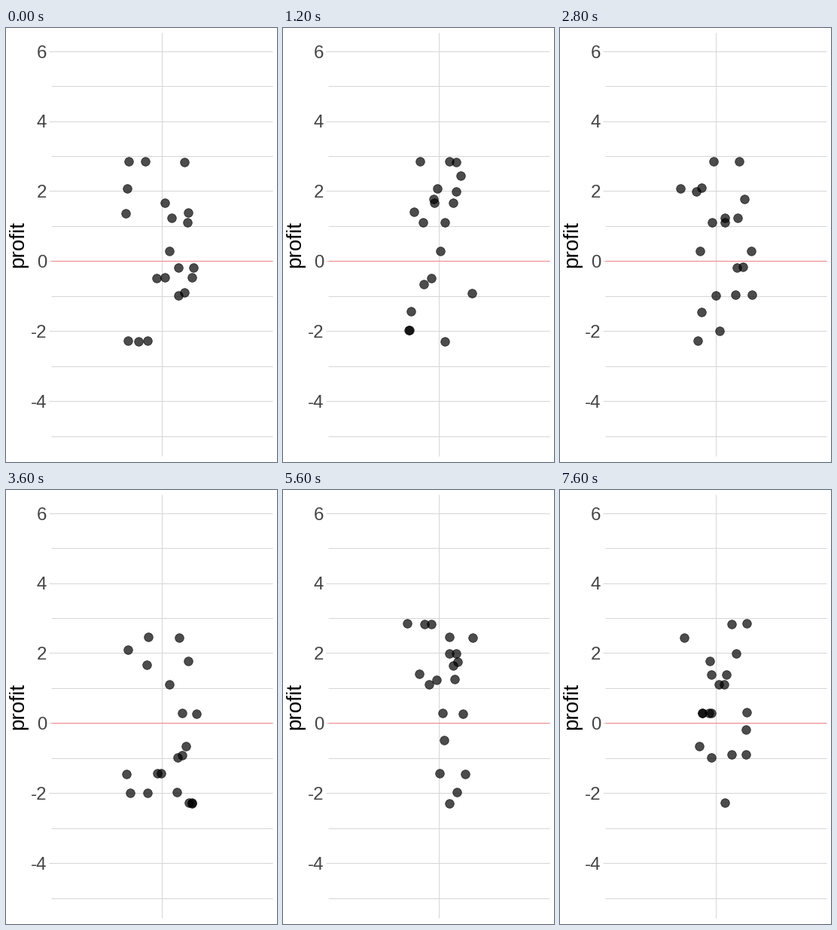
Write a matplotlib script that moves like this. It is 360x576 px and loops after 8000 ms.

```python
import math

import matplotlib.pyplot as plt
import numpy as np
from matplotlib.animation import FuncAnimation

W, H = 360, 576
ZERO_Y, UNIT = 309.9, 46.45
CENTER_X, SPREAD = 207, 48
GRID = "#d6d6d6"

DRAWS, INTERVAL = 20, 400
PROFITS = [2.85, 2.46, 2.09, 2.0, 1.78, 1.68, 1.42, 1.38, 1.25, 1.12,
           0.3, 0.3, -0.17, -0.46, -0.65, -0.89, -0.97, -1.43, -1.97, -2.27]


def to_y(profit):
    return ZERO_Y - UNIT * profit


def resample(i):
    """Bootstrap sample of the profits, spread sideways by jitter."""
    rng = np.random.default_rng(i)
    n = len(PROFITS)
    xs = CENTER_X + rng.uniform(-SPREAD, SPREAD, n)
    ys = to_y(rng.choice(PROFITS, n)) + rng.uniform(-0.7, 0.7, n)
    return np.column_stack([xs, ys])


plt.rcParams["font.family"] = "Liberation Sans"
fig = plt.figure(figsize=(W / 72, H / 72), dpi=72, facecolor="white")
ax = fig.add_axes([0, 0, 1, 1])
ax.set(xlim=(0, W), ylim=(H, 0))
ax.axis("off")


def line(x0, y0, x1, y1, color=GRID, order=1):
    ax.plot([x0, x1], [y0, y1], color=color, lw=1, zorder=order,
            solid_capstyle="butt")


for value in range(-5, 7):
    y = math.floor(to_y(value))
    labelled = value % 2 == 0
    line(57 if labelled else 60, y, 354, y)
    if labelled:
        ax.text(54, to_y(value) + 8.4, str(value), size=24, color="#444444",
                ha="right", va="baseline")
line(CENTER_X, 6, CENTER_X, 568)
line(60, math.floor(ZERO_Y), 354, math.floor(ZERO_Y), "#ee8084", 2)
ax.text(23.5, 286.5, "profit", size=28, color="black", rotation=90,
        ha="center", va="baseline", rotation_mode="anchor")

dots = ax.scatter(*resample(0).T, s=11.6 ** 2, lw=0.8, zorder=3,
                  facecolor=(0, 0, 0, 0.7), edgecolor=(0, 0, 0, 0.7))


def update(i):
    dots.set_offsets(resample(i))
    return [dots]


anim = FuncAnimation(fig, update, frames=DRAWS, interval=INTERVAL,
                     repeat=True, repeat_delay=0)
plt.show()
```
